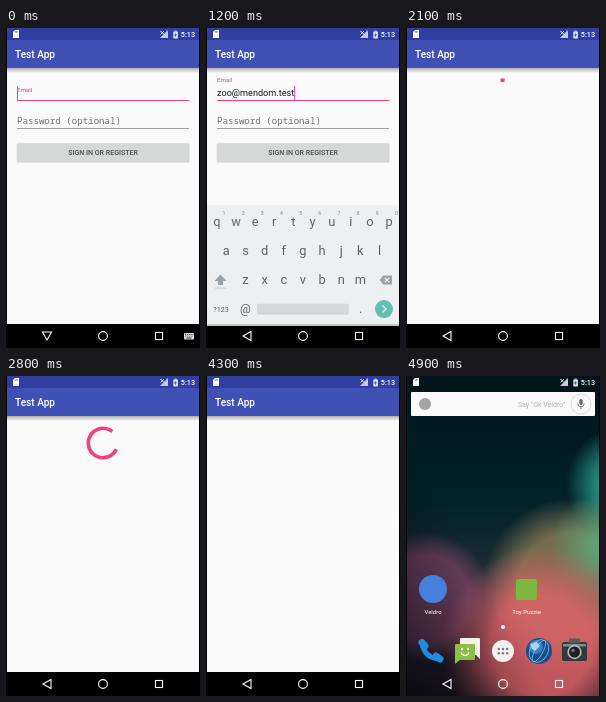
These frames come from a looping animation (194x320 px, 5000 ms). An HTML page with a canvas:

```html
<!DOCTYPE html>
<html lang="en">
<head>
<meta charset="utf-8">
<title>Sign in flow</title>
<style>
html, body { margin: 0; width: 100%; height: 100%; overflow: hidden; background: #000; }
canvas { display: block; width: 194px; height: 320px; }
</style>
</head>
<body>
<canvas id="stage"></canvas>
<script>
const W = 194, H = 320, LOOP = 5000, STEP = 100;
const PINK = '#f4407f', MAGENTA = '#e440a4';
const SANS = 'Roboto, sans-serif', MONO = '"Noto Sans Mono", "DejaVu Sans Mono", monospace';
const EMAIL = 'zoo@mendom.test';
const canvas = document.getElementById('stage');
const c = canvas.getContext('2d');
const dpr = window.devicePixelRatio || 1;
canvas.width = W * dpr;
canvas.height = H * dpr;

const clamp = v => Math.max(0, Math.min(1, v));
const ramp = (t, a, b) => clamp((t - a) / (b - a));
const ease = v => v * v * (3 - 2 * v);

function rect(x, y, w, h, color, r = 0) {
  c.fillStyle = color;
  c.beginPath();
  c.roundRect(x, y, w, h, r);
  c.fill();
}
function disc(x, y, r, color) {
  c.fillStyle = color;
  c.beginPath();
  c.arc(x, y, r, 0, 2 * Math.PI);
  c.fill();
}
function poly(points, color, width) {
  c.beginPath();
  points.forEach(([x, y], i) => i ? c.lineTo(x, y) : c.moveTo(x, y));
  c.closePath();
  if (width) { c.strokeStyle = color; c.lineWidth = width; c.stroke(); }
  else { c.fillStyle = color; c.fill(); }
}
function line(x1, y1, x2, y2, color, width) {
  c.strokeStyle = color;
  c.lineWidth = width;
  c.beginPath();
  c.moveTo(x1, y1);
  c.lineTo(x2, y2);
  c.stroke();
}
function text(s, x, y, size, color, { font = SANS, weight = 400, align = 'left' } = {}) {
  c.font = `${weight} ${size}px ${font}`;
  c.textAlign = align;
  c.fillStyle = color;
  c.fillText(s, x, y);
  return c.measureText(s).width;
}

function statusIcons() {
  poly([[9, 2], [13, 2], [13, 10], [7, 10], [7, 4]], '#fff');
  for (const x of [8.8, 10.3, 11.6]) rect(x, 3, 0.6, 1.8, '#667');
  poly([[162, 2], [162, 10], [154, 10]], '#c5cae9');
  line(154.5, 3, 158, 6.5, '#fff', 1);
  line(158, 3, 154.5, 6.5, '#fff', 1);
  rect(167.3, 3.5, 4.6, 7, '#dfe2f2', 0.6);
  rect(168.5, 2.6, 2.2, 1, '#dfe2f2');
  poly([[170, 4.4], [168, 7.4], [169.3, 7.4], [168.8, 9.6], [171, 6.5], [169.7, 6.5]], '#3a4699');
  text('5:13', 189, 9, 7.2, '#fff', { weight: 500, align: 'right' });
}

function navIcons(keyboardUp, color) {
  const back = keyboardUp
    ? [[36.5, 304], [45.5, 304], [41, 312]]
    : [[45, 303.5], [45, 312.5], [37, 308]];
  poly(back, color, 1.1);
  c.beginPath();
  c.arc(97, 308, 4.4, 0, 2 * Math.PI);
  c.stroke();
  c.strokeRect(149.5, 304.5, 7, 7);
  if (!keyboardUp) return;
  rect(178, 305, 10, 6.5, '#ddd', 0.8);
  for (let i = 0; i < 4; i++)
    for (let j = 0; j < 2; j++) rect(179.2 + i * 2.1, 306 + j * 1.7, 1, 0.9, '#222');
  rect(180.5, 309.6, 5, 0.9, '#222');
}

function toolbar() {
  rect(1, 0, 192, 12, '#303f9f');
  rect(1, 12, 192, 28, '#3f51b5');
  const g = c.createLinearGradient(0, 40, 0, 45);
  g.addColorStop(0, 'rgba(0,0,0,.3)');
  g.addColorStop(1, 'rgba(0,0,0,0)');
  rect(1, 40, 192, 5, g);
  text('Test App', 9, 30, 10.1, '#fff', { weight: 500 });
}

function field(t, f) {
  const age = t - f.from;
  const focused = age >= 0 && t < f.to;
  const opts = { font: f.font };
  let w = 0;
  if (f.value) w = text(f.value, 11, f.line - 4, 9.15, '#161616');
  else if (!focused) text(f.hint, 11, f.line - 4, 9.15, '#6f6f6f', opts);
  if (focused || f.value) {
    const slide = 1 - ramp(age, 0, 170);
    const color = !focused ? '#7c7c7c' : slide > 0 ? '#c93fa2' : PINK;
    text(f.hint, 11, f.line - 18 + 10 * slide, 6.2, color, opts);
  }
  if (focused) {
    rect(11, f.line, 172, 1, PINK);
    rect(11 + w, f.line - 14, 1, 14, MAGENTA);
  } else {
    rect(11, f.line, 172, 1, f.value ? '#f0f0f0' : '#a0a0a0');
  }
}

function form(t) {
  const typed = t >= 1000 ? 15 : t >= 700 ? 8 : t >= 500 ? 2 : t >= 400 ? 1 : 0;
  const dots = t >= 1800 ? 8 : t >= 1700 ? 4 : 0;
  field(t, { hint: 'Email', value: EMAIL.slice(0, typed), line: 72, from: 0, to: 1500, font: SANS });
  field(t, { hint: 'Password (optional)', value: '•'.repeat(dots), line: 100, from: 1500, to: 2100, font: MONO });
  rect(10.7, 116, 172.8, 18.6, 'rgba(0,0,0,.18)', 1.5);
  rect(11, 115.3, 172, 18.4, t >= 2000 ? '#bfc1c1' : '#d6d7d7', 1);
  text('SIGN IN OR REGISTER', 97, 127.4, 7.05, '#4c4c4c', { weight: 500, align: 'center' });
}

function keyboard(t) {
  const first = ramp(t, 0, 300) * (1 - ramp(t, 1166, 1366));
  const second = ramp(t, 1400, 1600) * (1 - ramp(t, 1850, 2050));
  const level = Math.max(first, second);
  if (level <= 0) return;
  const email = t < 1400;
  const ink = '#3a484f', grey = '#89949a', mid = { align: 'center' };
  c.save();
  c.globalAlpha = level;
  c.translate(0, 12 * (1 - level));
  rect(1, 175.5, 192, 120.5, '#eaeef0');
  const row = (keys, x, y) => [...keys].forEach((k, i) => text(k, x + i * 19.15, y, 12.8, ink, mid));
  row('qwertyuiop', 10.8, 196.2);
  row('asdfghjkl', 20.3, 225.2);
  row('zxcvbnm', 39.5, 254.2);
  [...'1234567890'].forEach((k, i) => text(k, 18 + i * 19.15, 185.3, 5.2, '#6a767c', mid));

  poly([[14.5, 244.5], [20.5, 251], [17, 251], [17, 255], [12, 255], [12, 251], [8.5, 251]], grey);
  rect(9, 257.5, 11, 1, '#b9c5c8');
  poly([[173.5, 250], [177, 245.5], [186, 245.5], [186, 254.5], [177, 254.5]], grey);
  line(178.7, 247.7, 183.3, 252.3, '#fff', 1.1);
  line(183.3, 247.7, 178.7, 252.3, '#fff', 1.1);

  text('?123', 15, 281.7, 7.2, ink, mid);
  text(email ? '@' : ',', 39.5, 283, 12, ink, mid);
  rect(51, 273.7, 92, 11, '#ced4d6', 2);
  text('.', 154.5, 283, 12, ink, mid);
  if (email) {
    disc(178, 279, 9, '#46b5a4');
    c.strokeStyle = '#fff';
    c.lineWidth = 1.4;
    c.beginPath();
    c.moveTo(176.5, 275.5);
    c.lineTo(180, 279);
    c.lineTo(176.5, 282.5);
    c.stroke();
  } else {
    text('Sign in', 178.5, 281.7, 7.2, ink, mid);
  }
  c.restore();
}

function spinner(t) {
  const u = (t - 2800) / 1333 + 0.5;
  const p = u - Math.floor(u);
  const base = 32 + 144 * (u - 0.5) + 90 * (p - 0.5);
  const pad = 7, rad = Math.PI / 180;
  c.strokeStyle = PINK;
  c.lineWidth = 3.6;
  c.beginPath();
  c.arc(97, 67, 14.7,
    (base + 270 * ease(clamp(2 * p - 1)) - pad) * rad,
    (base + 270 * ease(clamp(2 * p)) + pad) * rad);
  c.stroke();
}

function glow(x, y, r, rgb, alpha, hold = 0) {
  const g = c.createRadialGradient(x, y, r * hold, x, y, r);
  g.addColorStop(0, `rgba(${rgb},${alpha})`);
  g.addColorStop(1, `rgba(${rgb},0)`);
  rect(1, 0, 192, H, g);
}

function wallpaper() {
  const g = c.createLinearGradient(0, 0, 0, H);
  g.addColorStop(0, '#01141a');
  g.addColorStop(0.4, '#02222a');
  g.addColorStop(0.7, '#27303a');
  g.addColorStop(1, '#1c1620');
  rect(1, 0, 192, H, g);
  glow(218, 108, 58, '45,175,155', 0.95, 0.3);
  glow(165, 210, 88, '140,125,85', 0.8, 0.6);
  glow(200, 170, 55, '90,175,125', 0.8, 0.2);
  glow(20, 222, 66, '135,72,108', 0.75, 0.65);
  glow(135, 270, 100, '222,98,104', 0.85, 0.5);
  const shade = c.createLinearGradient(0, 320, 110, 260);
  shade.addColorStop(0, 'rgba(8,6,14,.75)');
  shade.addColorStop(1, 'rgba(8,6,14,0)');
  rect(1, 0, 192, H, shade);
}

function searchBar(t) {
  const show = ramp(t, 4500, 4900);
  rect(5, 16, 184, 24, '#fafafa', 1);
  disc(19, 28, 6, '#a3a3a3');
  c.globalAlpha = show;
  text('Say "Ok Veldro"', 159, 30.5, 7, '#b4b4b4', { align: 'right' });
  c.strokeStyle = '#d5d5d5';
  c.lineWidth = 0.8;
  c.beginPath();
  c.arc(175, 28, 10, 0, 2 * Math.PI);
  c.stroke();
  c.globalAlpha = 1;
  rect(173.4, 23, 3.2, 6, '#666', 1.6);
  c.strokeStyle = '#666';
  c.lineWidth = 0.9;
  c.beginPath();
  c.arc(175, 27.5, 3.2, 0, Math.PI);
  c.moveTo(175, 30.7);
  c.lineTo(175, 33);
  c.stroke();
}

function dock() {
  // handset
  c.lineCap = 'round';
  c.strokeStyle = '#1e8be0';
  c.lineWidth = 5;
  c.beginPath();
  c.moveTo(16, 267);
  c.quadraticCurveTo(18, 281, 32, 283);
  c.stroke();
  c.lineWidth = 7;
  c.beginPath();
  c.moveTo(16, 266.5);
  c.lineTo(19, 270);
  c.moveTo(30, 280);
  c.lineTo(34, 283);
  c.stroke();
  c.lineCap = 'butt';

  // messages
  rect(54, 262, 20, 17, '#f1f3ea', 1);
  poly([[69, 278], [74, 278], [74, 283]], '#f1f3ea');
  rect(49, 268, 20, 16, '#8bbf45', 1);
  poly([[49, 282], [55, 283], [49, 288]], '#8bbf45');
  disc(56, 273, 1.2, '#fff');
  disc(62, 273, 1.2, '#fff');
  c.strokeStyle = '#fff';
  c.lineWidth = 1.2;
  c.beginPath();
  c.arc(59, 275.5, 4, 0.2, Math.PI - 0.2);
  c.stroke();

  // all apps
  disc(97, 275, 11, '#f3f0f0');
  for (let i = 0; i < 6; i++) disc(92.8 + i % 3 * 4.2, 273 + (i > 2 ? 4.2 : 0), 1.2, '#777');

  // globe
  disc(133, 275, 13, '#164f8c');
  disc(130, 271, 7, '#2f83c8');
  c.strokeStyle = '#8cc3e6';
  c.lineWidth = 0.8;
  for (const r of [4, 9]) {
    c.beginPath();
    c.ellipse(133, 275, r, 12, 0.5, 0, 2 * Math.PI);
    c.stroke();
  }
  poly([[124, 268], [131, 266], [134, 270], [129, 275], [126, 273]], '#a9d4ee');

  // camera
  rect(156, 266, 25, 19, '#34383b', 2);
  rect(163, 262.5, 11, 5, '#55595c', 1);
  rect(157, 268, 23, 2.5, '#85898c');
  disc(168.5, 276, 7.2, '#b4b8ba');
  disc(168.5, 276, 5.5, '#1b2024');
  disc(167, 274.5, 1.8, '#5c7383');
}

function home(t) {
  wallpaper();
  searchBar(t);
  disc(27, 213, 14, '#4580dd');
  rect(110, 203, 21, 21, '#7cb83f', 2);
  text('Veldro', 27, 238, 6, '#fff', { align: 'center' });
  text('Toy Puzzle', 120.5, 238, 6, '#fff', { align: 'center' });
  disc(97, 251, 2, '#fff');
  dock();
}

function app(t) {
  rect(1, 0, 192, H, '#fafafa');
  toolbar();
  if (t < 2100) form(t);
  else if (t < 4300) spinner(t);
}

function draw(t) {
  c.setTransform(dpr, 0, 0, dpr, 0, 0);
  rect(0, 0, W, H, '#000');
  if (t < 4400) {
    app(t);
    rect(0, 296, W, 24, '#000');
    navIcons(t < 1200 || (t >= 1500 && t < 1900), '#fff');
    keyboard(t);
  } else {
    const y = 140 * ((t - 4300) / 200) ** 2;
    home(t);
    c.save();
    c.translate(0, y);
    app(t);
    c.restore();
    navIcons(false, y < 300 ? '#efefef' : '#fff');
    rect(193, 0, 1, H, '#000');
  }
  statusIcons();
}

const start = performance.now();
function tick() {
  const t = (performance.now() - start) % LOOP;
  draw(Math.floor(t / STEP) * STEP);
  requestAnimationFrame(tick);
}
tick();
</script>
</body>
</html>
```
